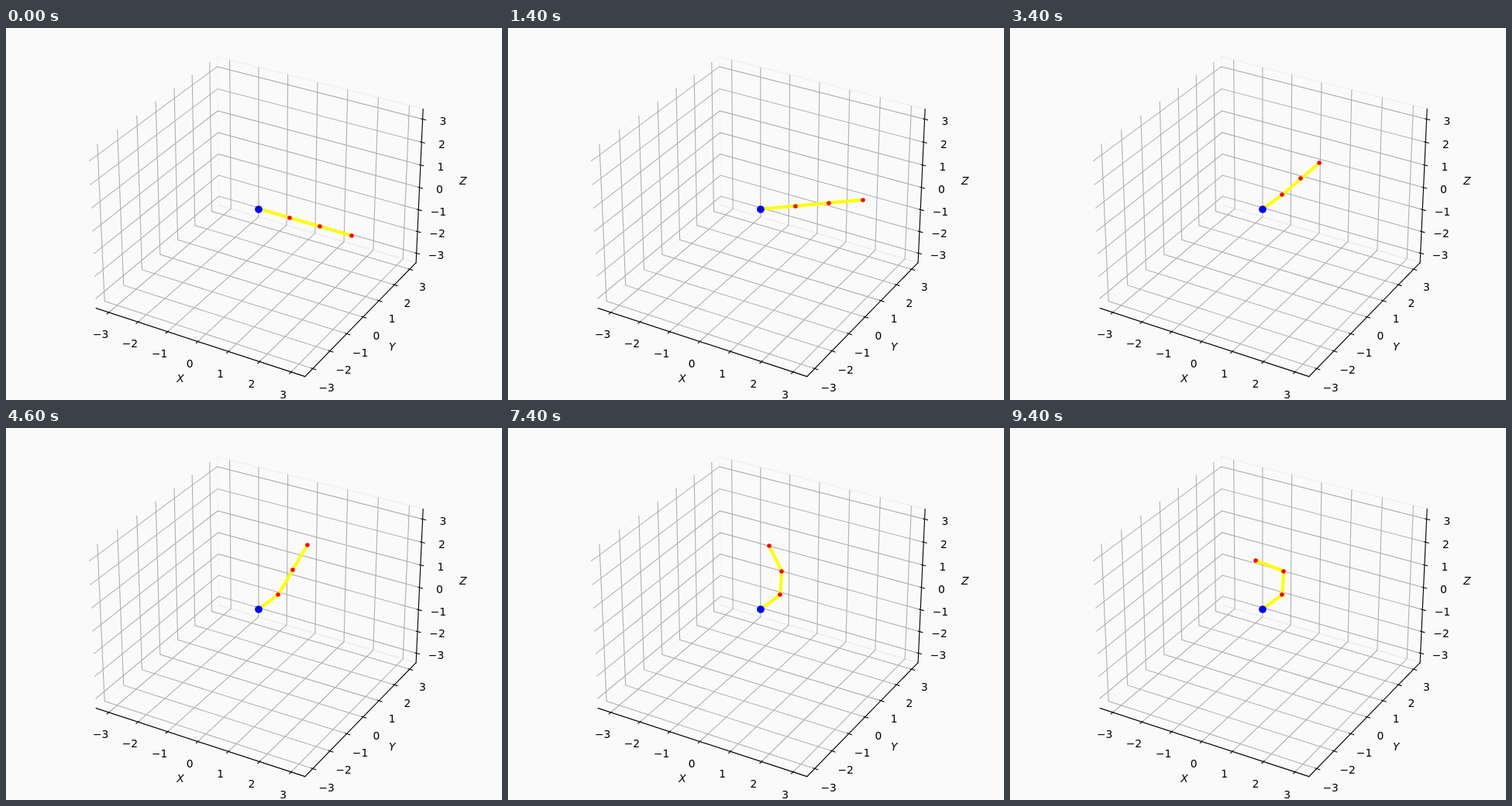
Write an HTML page that moves like this. It is 640 by 480 pixels and loops after 9600 ms.

```html
<!DOCTYPE html>
<html lang="en">
<head>
<meta charset="utf-8">
<title>Three-joint arm</title>
<style>
  html, body { margin: 0; width: 100%; height: 100%; overflow: hidden; background: #fafafa; }
  svg { display: block; }
  text { font: 13.89px "DejaVu Sans", sans-serif; text-anchor: middle; }
  .title { font-style: oblique; }
</style>
</head>
<body>
<svg id="stage" width="640" height="480" viewBox="0 0 640 480"></svg>
<script>
const stage = document.getElementById('stage');
const LIMIT = 3.3, DELTA = LIMIT / 6, WALL = LIMIT + DELTA / 4;
const HAIR = 0.8 / 0.72;

// Perspective camera: azimuth -60 degrees, elevation 30 degrees, distance 10.
const COS = Math.sqrt(3) / 2;
const BOX = [4, 4, 3].map(side => side / 3.5 / (2 * LIMIT));
const RIGHT = [COS, 0.5, 0], UP = [-0.25, COS / 2, COS], TOWARD = [COS / 2, -0.75, 0.5];
const ZOOM = 480 / 0.185, CENTER = [80 + ZOOM * 0.095, 480 - ZOOM * 0.095];

const dot = (a, b) => a[0] * b[0] + a[1] * b[1] + a[2] * b[2];

function project(point) {
  const p = point.map((value, i) => value * BOX[i]);
  const scale = ZOOM / (10 - dot(TOWARD, p));
  return [CENTER[0] + scale * dot(RIGHT, p), CENTER[1] - scale * dot(UP, p)];
}

const toPoints = list => list.map(p => project(p).map(v => v.toFixed(2)).join()).join(' ');

function add(tag, attributes, text = '') {
  const node = document.createElementNS('http://www.w3.org/2000/svg', tag);
  for (const name in attributes) node.setAttribute(name, attributes[name]);
  node.textContent = text;
  stage.append(node);
  return node;
}

const line = (list, stroke, width = HAIR, extra = {}) => add('polyline',
  { points: toPoints(list), fill: 'none', stroke, 'stroke-width': width, ...extra });

const withValue = (point, axis, value) => point.map((v, i) => i === axis ? value : v);

// Pushes a point away from the box on every axis except its own.
const pushOut = (point, axis, amount) =>
  point.map((v, i) => i === axis ? v : v + Math.sign(v) * amount);

function label(point, text, drop, className) {
  const [x, y] = project(point);
  add('text', { x: x.toFixed(2), y: Math.round(y + drop), class: className }, text);
}

function drawPanes() {
  const W = WALL;
  const left = [-W, -W, -W], front = [W, -W, -W], right = [W, W, -W], back = [-W, W, -W];
  const raise = p => withValue(p, 2, W);
  const edge = (list, level) => line(list, `rgba(${level},${level},${level},.5)`, 1 / 0.72);
  edge([left, back, raise(back), raise(left)], 242);
  edge([back, right, raise(right), raise(back)], 230);
  edge([left, front, right, back], 236);
}

function drawAxis(axis, name, edge, tickAxis) {
  const corner = [-WALL, WALL, -WALL];
  line([withValue(edge, axis, -WALL), withValue(edge, axis, WALL)], '#000', HAIR,
    { 'stroke-linecap': 'square' });
  label(pushOut(edge, axis, DELTA * 25 / 14.4), name, 4, 'title');

  for (let n = -3; n <= 3; n++) {
    const bend = withValue(corner, axis, n);
    const next = (axis + 1) % 3, last = (axis + 2) % 3;
    line([withValue(bend, next, -bend[next]), bend, withValue(bend, last, -bend[last])], '#b0b0b0');
  }
  for (let n = -3; n <= 3; n++) {
    const at = withValue(edge, axis, n);
    const base = at[tickAxis], side = Math.sign(base);
    line([withValue(at, tickAxis, base - side * DELTA * 0.1),
          withValue(at, tickAxis, base + side * DELTA * 0.2)], '#000');
    label(pushOut(at, axis, DELTA * 11.5 / 14.4), String(n).replace('-', '\u2212'), 11, 'tick');
  }
}

drawPanes();
drawAxis(0, 'X', [0, -WALL, -WALL], 1);
drawAxis(1, 'Y', [WALL, 0, -WALL], 0);
drawAxis(2, 'Z', [WALL, WALL, 0], 0);

const arm = line([], '#ff0', 3 / 0.72, { 'stroke-linejoin': 'round', 'stroke-linecap': 'square' });
const joints = [4.86, 2.78, 2.78, 2.78].map((r, i) => add('circle', { r, fill: i ? '#f00' : '#00f' }));

// Yaw turns the base, pitch lifts the outer links, bend swings the last one sideways.
function pose(yaw, pitch, bend) {
  const { sin, cos } = Math;
  const first = [cos(yaw), sin(yaw), 0];
  const second = [cos(pitch) * cos(yaw), cos(pitch) * sin(yaw), sin(pitch)];
  const sideways = [-sin(yaw), cos(yaw), 0];
  const third = second.map((v, i) => v * cos(bend) + sideways[i] * sin(bend));
  const chain = [[0, 0, 0]];
  for (const link of [first, second, third]) {
    const from = chain[chain.length - 1];
    chain.push(from.map((v, i) => v + link[i]));
  }
  return chain;
}

function render(time) {
  const step = Math.floor(time % 9600 / 200);
  const angle = start => Math.min(15, Math.max(0, step - start)) / 10;
  const chain = pose(angle(0), angle(16), angle(32));
  arm.setAttribute('points', toPoints(chain));
  chain.forEach((point, i) => {
    const [x, y] = project(point);
    joints[i].setAttribute('cx', Math.round(x));
    joints[i].setAttribute('cy', Math.round(y));
  });
}

function tick() {
  render(performance.now());
  requestAnimationFrame(tick);
}
tick();
</script>
</body>
</html>
```
